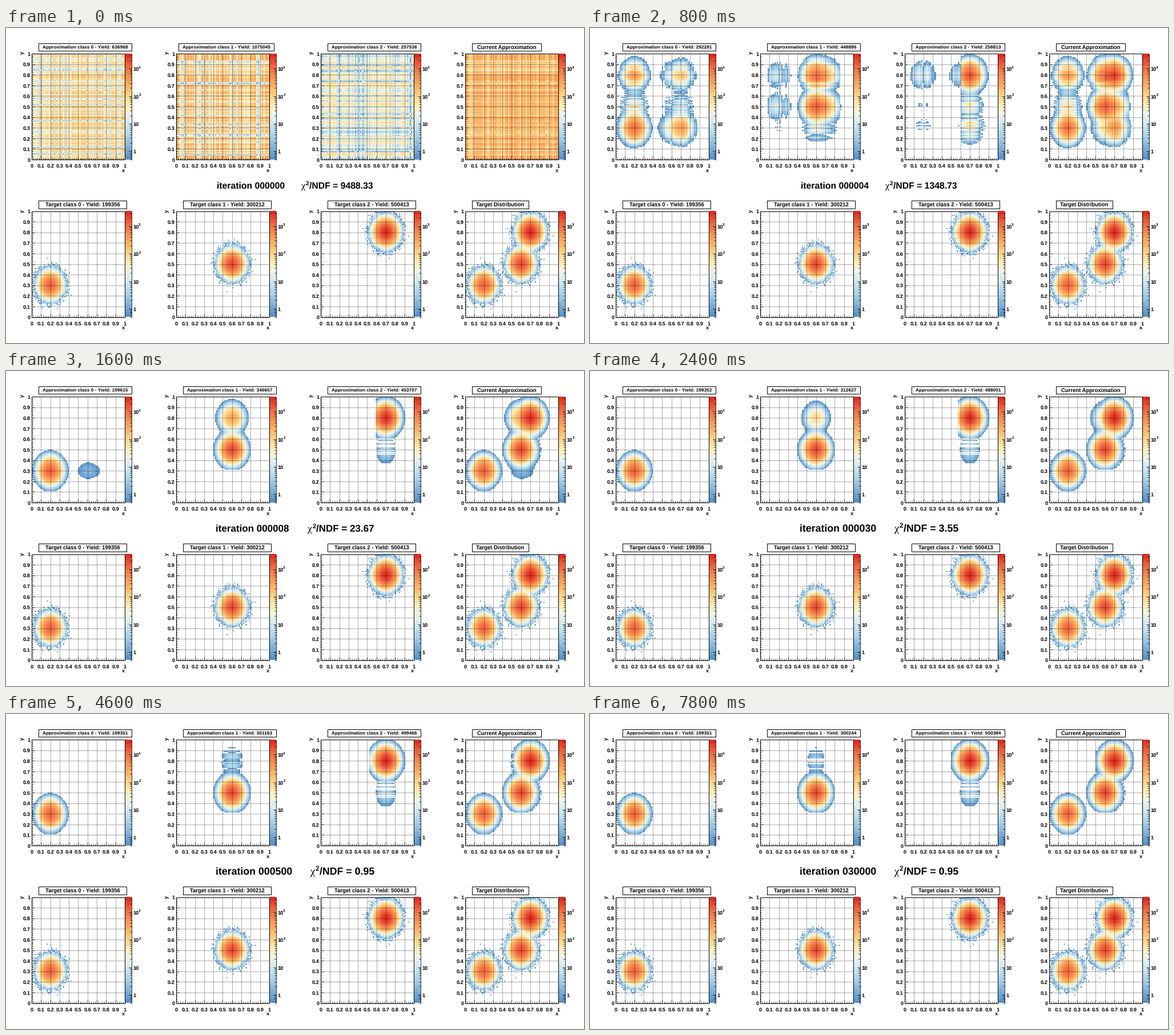
A matplotlib script that plays this animation: 1012x553 px, repeating every 8 s.

```python
import numpy as np
import matplotlib.pyplot as plt
from matplotlib.animation import FuncAnimation
from matplotlib.collections import LineCollection
from matplotlib.colors import LinearSegmentedColormap
from matplotlib.patches import Rectangle

plt.rcParams["text.hinting"] = "none"

W, H, DPI = 1012, 553, 64
PT = 72 / DPI                      # points per pixel
PAD_W, PAD_H = W / 4, H / 2
LEFT, TOP, PLOT_W, PLOT_H = 45, 45, 163, 186
BAR_W = 11
BINS = 100
SIGMA = 0.05
Z_MIN, Z_MAX = np.log10(0.5), np.log10(3500)
TICK_SIZE = 9.3

ITERATIONS = (list(range(10)) + [m * 10 ** d for d in (1, 2, 3) for m in range(1, 10)]
              + [10000, 20000, 30000])

CMAP = LinearSegmentedColormap.from_list("heat", [
    (0.00, "#5591c9"), (0.22, "#abd3e9"), (0.34, "#d3eaf4"), (0.43, "#f0f5e6"),
    (0.50, "#fdeebb"), (0.60, "#fed58a"), (0.68, "#fdb76a"), (0.78, "#fa9355"),
    (0.88, "#f16a42"), (1.00, "#e0281f")])

rng = np.random.default_rng(12)
centers = (np.arange(BINS) + 0.5) / BINS

X_MEANS, Y_MEANS = (0.2, 0.6, 0.7), (0.3, 0.5, 0.8)
TARGET_YIELDS = (199356, 300212, 500413)
START_YIELDS = (636968, 1075045, 257538)
TOTAL = 999979.5

# How much of each blob (columns) a class (rows) still holds early on
X_SHARES = [(1, .02, .35), (.012, 1, .3), (.012, .004, 1)]
Y_SHARES = [(1, .05, .35), (.024, 1, .79), (.05, .02, 1)]

# Key points by iteration: surplus yields of the first two classes, fit quality
SURPLUS_0 = {1: 124050, 4: 92930, 8: 264, 70: .01}
SURPLUS_1 = {1: 245560, 4: 148645.7, 8: 46417.3, 70: 5311.3, 500: 922.7,
             5000: 1.7, 9000: 4.3}
CHI2 = {1: 2700, 4: 1348.73, 8: 23.67, 70: 1.05, 500: .95}

X_NOISE, Y_NOISE = rng.uniform(0.02, 1, (2, 3, BINS))
Y_LASTING = rng.random((3, BINS)) < 0.5    # rows that keep a leftover
X_LASTING = np.full((3, BINS), True)


def at_iteration(points, n):
    """Interpolate positive key points on log-log scales."""
    return np.exp(np.interp(np.log(n), np.log(list(points)), np.log(list(points.values()))))


def gauss(mean):
    return np.exp(-0.5 * ((centers - mean) / SIGMA) ** 2)


def profile(n, main, means, shares, leaks, cuts, noise, lasting):
    """One-dimensional shape of a class: its own blob plus fading foreign ones."""
    early = np.clip((8 - n) / 4, 0, 1)
    total = np.zeros(BINS)
    for g, mean in enumerate(means):
        blob = np.where(centers < cuts[g], 0, gauss(mean))
        if g == main:
            total += blob * (noise / 0.6) ** (early * 0.5 / n)
            continue
        weight = shares[g] ** ((min(n, 8) / 4) ** 3) * 8 / max(n, 8) + leaks[g]
        rank = np.log10(weight + 1e-12)
        rough = early * min(1, 0.3 - 0.6 * rank)
        sparse = (1 - early) * np.clip(-1.8 * (rank + 2), 0, 1.6)
        band = np.where(lasting, gauss(mean) ** -0.3, 0.18)
        total += weight * blob * (noise / 0.6) ** rough * band ** sparse
    return total


def x_profile(k, n):
    leaks = [0.0012 * (8 / n) ** 3 if (k, g) == (0, 1) else 0 for g in range(3)]
    cuts = [0, 0, max(0.5, 0.62 - 0.036 * np.log10(n)) if k == 2 else 0]
    return profile(n, k, X_MEANS, X_SHARES[k], leaks, cuts, X_NOISE[k], X_LASTING[k])


def y_profile(k, n):
    leaks = [0.0015 if k > 0 and g > 0 else 0 for g in range(3)]
    cuts = [mean - 3.7 * SIGMA for mean in Y_MEANS]
    return profile(n, k, Y_MEANS, Y_SHARES[k], leaks, cuts, Y_NOISE[k], Y_LASTING[k])


def yields(n):
    if n == 0:
        return START_YIELDS
    first = 199351 + at_iteration(SURPLUS_0, n)
    second = 300240 + at_iteration(SURPLUS_1, n)
    return [round(v) for v in (first, second, TOTAL - first - second)]


def approximation(k, n):
    if n == 0:
        grid = np.outer(Y_NOISE[k], X_NOISE[k])
    else:
        grid = np.outer(y_profile(k, n), x_profile(k, n))
    return yields(n)[k] * grid / grid.sum()


def to_log(counts):
    return np.log10(np.where(counts < 0.5, np.nan, counts))


fig = plt.figure(figsize=(W / DPI, H / DPI), dpi=DPI, facecolor="white")
ax = fig.add_axes([0, 0, 1, 1])
ax.axis("off")


def label(x, y, s, size, ha="left"):
    """Bold text whose capitals are centred on y."""
    return ax.text(x, y + 0.36 * size, s, fontsize=size * PT, ha=ha, va="baseline",
                   family="Liberation Sans", weight="bold", color="black")


def lines(segments, **style):
    ax.add_collection(LineCollection(segments, colors="black", **style))


def outline(x, y, w, h):
    return ax.add_patch(Rectangle((x, y), w, h, fill=False, lw=PT, zorder=3))


def image(data, x, y, w, h):
    return ax.imshow(data, cmap=CMAP, vmin=Z_MIN, vmax=Z_MAX, origin="lower",
                     extent=(x, x + w, y + h, y), aspect="auto",
                     interpolation="nearest", zorder=1)


def panel(col, row):
    x0, y0 = LEFT + col * PAD_W, TOP + row * PAD_H
    x1, y1 = x0 + PLOT_W, y0 + PLOT_H
    edge = x1 + 1 + BAR_W
    picture = image(np.full((BINS, BINS), np.nan), x0, y0, PLOT_W, PLOT_H)
    image(np.linspace(Z_MIN, Z_MAX, 99)[:, None], x1 + 1, y0, BAR_W, PLOT_H)

    grid, ticks = [], [[(edge, y0), (edge, y1)]]
    for i in range(51):
        px, py = x0 + PLOT_W * i / 50, y1 - PLOT_H * i / 50
        major = i % 5 == 0
        ticks += [[(px, y1), (px, y1 - (5.6 if major else 2.8))],
                  [(x0, py), (x0 + (5 if major else 2.5), py)]]
        if major:
            name = f"{i / 50:g}"
            label(px, y1 + 11, name, TICK_SIZE, "center")
            label(x0 - 2.3, py + .3, name, TICK_SIZE, "right")
            if 0 < i < 50:
                grid += [[(px, y0), (px, y1)], [(x0, py), (x1, py)]]
    lines(grid, linewidths=0.8 * PT, linestyles=(0, (1.2, 1.8)), zorder=2)

    for decade in range(-1, 4):
        for m in range(1, 10):
            z = decade + np.log10(m)
            if not Z_MIN <= z <= Z_MAX:
                continue
            py = y1 - PLOT_H * (z - Z_MIN) / (Z_MAX - Z_MIN)
            ticks.append([(edge, py), (edge - (5 if m == 1 else 2.5), py)])
            if m == 1:
                label(edge + 2, py + .5, "1" if decade == 0 else "10", TICK_SIZE)
                if decade > 1:
                    label(edge + 12.3, py - 2.8, str(decade), 6.2)
    lines(ticks, linewidths=0.8 * PT, zorder=3)
    outline(x0, y0, PLOT_W, PLOT_H)

    label(x1, y1 + 18.5, "x", TICK_SIZE, "right")
    ax.text(x0 - 16.5, y0 - 2 + 2 * row, "y", fontsize=TICK_SIZE * PT, rotation=90,
            ha="center", va="center", family="Liberation Sans", weight="bold")
    return picture


def title(col, row, s, size, width):
    x, y = 57 + col * PAD_W, 26.5 + row * PAD_H
    return (outline(x, y, width, 13.5),
            label(x + width / 2, y + 6.6, s, size, "center"))


pictures = [panel(c, 0) for c in range(4)]
targets = [panel(c, 1) for c in range(4)]

counts = []
for k, amount in enumerate(TARGET_YIELDS):
    shape = np.outer(gauss(Y_MEANS[k]), gauss(X_MEANS[k]))
    counts.append(rng.poisson(amount * shape / shape.sum()))
    title(k, 1, f"Target class {k} - Yield: {amount}", 9.55, 154)
for picture, data in zip(targets, counts + [sum(counts)]):
    picture.set_data(to_log(data))

titles = [title(k, 0, "", 8.35, 163) for k in range(3)]
title(3, 0, "Current Approximation", 9.55, 121)
title(3, 1, "Target Distribution", 9.55, 99)

BASELINE = 282
SANS = dict(family="Liberation Sans", weight="bold")
heading = ax.text(0, BASELINE, "", **SANS)
fit = ax.text(0, BASELINE, "", ha="right", **SANS)
square = ax.text(0, BASELINE, "2", **SANS)
chi = ax.text(0, BASELINE, "χ", family="Liberation Serif")

ax.set_xlim(0, W)
ax.set_ylim(H, 0)


def set_heading(n):
    value = f"{at_iteration(CHI2, n) if n else 9488.33:.2f}"
    size = 15.75 + 0.65 * (7 - len(value))
    right = 643 if len(value) == 7 else 645
    ems = 3.473 + 0.556 * (len(value) - 1) + 0.278   # width of the "/NDF = ..." part
    start = right - ems * size
    heading.set_text(f"iteration {n:06d}")
    heading.set_x(W - right)
    fit.set_text(f"/NDF = {value}")
    fit.set_x(right)
    chi.set_x(start - 0.95 * size)
    square.set_position((start - 0.4 * size, BASELINE - 0.38 * size))
    for part, scale in ((heading, 1), (fit, 1), (chi, 1.05), (square, 0.66)):
        part.set_fontsize(size * scale * PT)


def update(i):
    n = ITERATIONS[i]
    grids = [approximation(k, n) for k in range(3)]
    for picture, data in zip(pictures, grids + [sum(grids)]):
        picture.set_data(to_log(data))
    for k, amount in enumerate(yields(n)):
        box, text = titles[k]
        wide = amount >= 10 ** 6
        x, width = 57 + k * PAD_W - 7.5 * wide, 163 + 4 * wide
        box.set_x(x)
        box.set_width(width)
        text.set_x(x + width / 2)
        text.set_text(f"Approximation class {k} - Yield: {amount}")
    set_heading(n)
    return []


anim = FuncAnimation(fig, update, frames=len(ITERATIONS), interval=200,
                     repeat=True, repeat_delay=0, blit=False)
plt.show()
```
